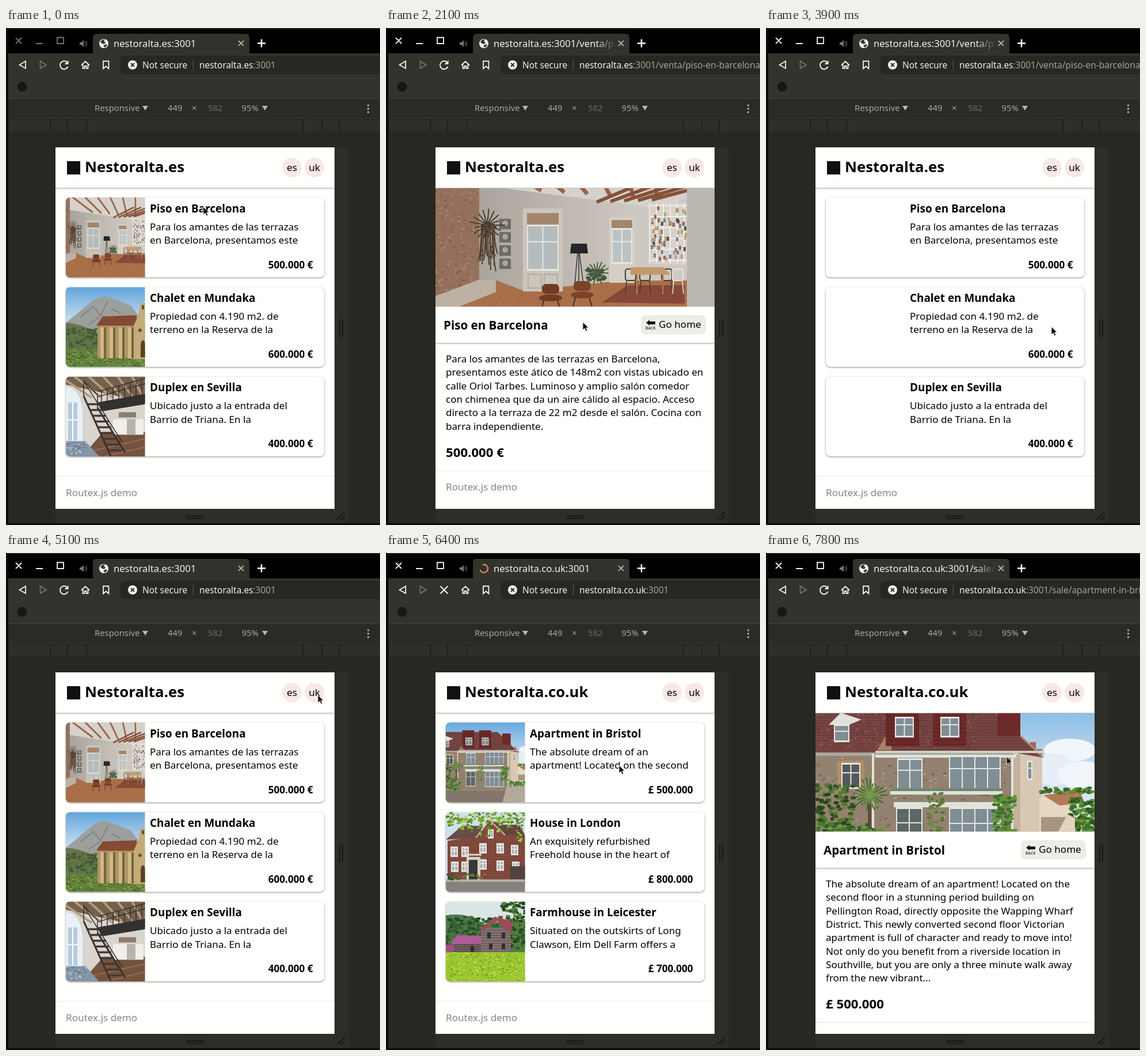
These frames come from a looping animation (650x862 px, 8000 ms). An HTML page:

```html
<!DOCTYPE html>
<html lang="en">
<head>
<meta charset="utf-8">
<title>Property listing demo</title>
<style>
html, body { margin: 0; width: 100%; height: 100%; overflow: hidden; background: #272822; }
svg { display: block; font-family: "Noto Sans", sans-serif; }
text { white-space: pre; }
.page { font-size: 17.1px; }
.serif { font-family: "Liberation Serif", serif; }
.bold { font-weight: 700; }
.card { fill: #fffffd; filter: drop-shadow(0 1px 1.5px rgba(0,0,0,.45)); }
.bar { fill: #fffffd; filter: drop-shadow(0 1px 1.5px rgba(0,0,0,.4)); }
.bare .photo { display: none; }
</style>
</head>
<body>
<svg id="stage" width="650" height="862" viewBox="0 0 650 862"></svg>
<script>
const BRAND = 'Nestoralta', HOST = 'nestoralta';
const $ = id => document.getElementById(id);

let seed = 7;
const rnd = () => (seed = (Math.imul(seed, 1664525) + 1013904223) >>> 0) / 2 ** 32;
const times = (n, f) => Array.from({ length: n }, (_, i) => f(i)).join('');
const rect = (x, y, w, h, fill, more = '') => `<rect x="${x}" y="${y}" width="${w}" height="${h}" fill="${fill}" ${more}/>`;
const path = (d, fill, more = '') => `<path d="${d}" fill="${fill}" ${more}/>`;
const line = (d, color, w = 1, more = '') => path(d, 'none', `stroke="${color}" stroke-width="${w}" ${more}`);
const disc = (x, y, r, fill, ry = r) => `<ellipse cx="${x}" cy="${y}" rx="${r}" ry="${ry}" fill="${fill}"/>`;
const text = (x, y, s, more = '') => `<text x="${x}" y="${y}" ${more}>${s}</text>`;

// Scattered leaves, stones or flowers inside a box
const scatter = (n, x, y, w, h, r, ...colors) => times(n, () =>
  disc((x + rnd() * w).toFixed(1), (y + rnd() * h).toFixed(1), r * (.6 + rnd() * .6), colors[rnd() * colors.length | 0], r * .6));
const spikes = (x, y, r, n, color) => line(times(n, i => {
  const a = i / n * 6.28, k = r * (.7 + rnd() * .4);
  return `M${x} ${y}l${(k * Math.cos(a)).toFixed(1)} ${(k * Math.sin(a)).toFixed(1)}`;
}), color, 2);
const panes = (x, y, w, h, n, glass = '#808d94') => rect(x, y, w, h, '#e6e7e2') +
  times(n, i => rect(x + 2 + i * (w - 2) / n, y + 3, (w - 2) / n - 2, h - 6, glass)) +
  rect(x, y + h * .36, w, 2, '#e6e7e2');

const chair = (x, y, c) => rect(x - 15, y - 14, 30, 17, c, 'rx="7"') + disc(x, y + 10, 20, c, 6) +
  line(`M${x - 12} ${y + 14}l-4 17M${x + 12} ${y + 14}l5 17`, '#4a2a1a', 2);

const photos = {
  piso: rect(80, 205, 500, 340, 'url(#wall)') +
    path('M160 205H580V278L470 312 330 294 160 272z', '#d6d2cb') +
    line(times(6, i => `M${270 + 40 * i} ${282 + 3 * i}L${160 + 62 * i} 214`), '#9b6347', 7) +
    line(times(5, i => `M${366 + 24 * i} ${302 - i}L${462 + 34 * i} 262`), '#87503a', 6) +
    path('M80 450L190 437 240 456 410 438H530V545H80z', '#a96f48') +
    line(times(7, i => `M${150 + 45 * i} 545L${205 + 34 * i} 455`), '#94603c') +
    path('M80 205H162V442L86 484H80z', '#94705c') +
    scatter(260, 84, 210, 76, 245, 2.6, '#a88470', '#80604f', '#9c7865') +
    path('M86 465L160 437H191V458L125 484H86z', '#bdb1a3') +
    times(4, i => rect(197, 331 + 23 * i, 20, 18, '#6d6b68') + disc(207, 339 + 23 * i, 5, '#a9a6a1')) +
    path('M375 476L420 446H519V478z', '#85493a') +
    rect(238, 313, 69, 144, '#cbc5bb') + rect(245, 321, 55, 20, '#a3876c') +
    panes(245, 341, 55, 80, 2, '#b4bcbd') + line('M247 427h23v24h-23zM275 427h23v24h-23z', '#aca59b', 1.5) +
    rect(388, 328, 44, 114, '#d5cfc6') + rect(392, 333, 36, 14, '#a3876c') + panes(392, 347, 36, 62, 2, '#bcc3c4') +
    rect(458, 302, 66, 108, '#d6d1ca') +
    line(times(6, i => `M${458 + 12 * i} 304v104`) + times(6, i => `M458 ${308 + 19 * i}h66`), '#f1eeea', 2) +
    times(60, () => rect(460 + rnd() * 60 | 0, 308 + rnd() * 92 | 0, 4, 7, ['#9c6259', '#77838a', '#b7a27c', '#55504a'][rnd() * 4 | 0])) +
    rect(523, 205, 57, 340, '#bab7b1') +
    spikes(176, 342, 30, 17, '#493b2e') +
    line(times(12, i => `M${166 + 2 * i} 340q${rnd() * 12 - 6 | 0} 35 ${i - 5} ${50 + rnd() * 35 | 0}`), '#4d3e30', 2) +
    scatter(30, 166, 335, 24, 65, 3, '#493b2e', '#685340') +
    line('M333 390L328 445M336 390L343 445M335 390V445', '#393734', 1.5) +
    path('M322 374H349L351 391H320z', '#242526') +
    spikes(366, 425, 22, 17, '#4f6141') + scatter(20, 350, 415, 32, 25, 4, '#42583a') +
    [425, 450, 488, 507].map((x, i) => rect(x - 9, 418, 18, 20, 'none', `rx="4" stroke="${i > 2 ? '#ece7dd' : '#4a382b'}" stroke-width="2"`) +
      line(`M${x - 7} 438l-2 23M${x + 8} 438l2 23`, i > 2 ? '#ece7dd' : '#4a382b', 1.6)).join('') +
    path('M425 415H482L495 428H425z', '#c29a69') + line('M436 428v34M481 428v34', '#a77a50', 3) +
    chair(286, 458, '#6f3b25') + chair(341, 453, '#7b432a'),

  bristol: rect(80, 205, 500, 390, 'url(#sky)') +
    disc(528, 342, 45, '#f1f6fa', 20) + disc(500, 375, 35, '#e6eff7', 28) + disc(550, 385, 42, '#f1f6fa', 24) +
    rect(80, 340, 400, 250, '#93826f') + scatter(420, 84, 346, 350, 185, 3, '#aa9985', '#79695a', '#9a7f66', '#8a7c6d') +
    path('M430 345L480 352V500H430z', '#d8c8b3') + panes(454, 360, 9, 34, 1) + rect(430, 350, 12, 150, '#c3b29c') +
    rect(459, 328, 10, 22, '#ae6051') +
    path('M80 258H380L482 355 430 346H80z', '#774643') +
    line(times(17, i => `M80 ${261 + 5 * i}H${381 + 5.2 * i}`), '#5f3534') +
    scatter(240, 84, 260, 285, 78, 2.5, '#8a5752', '#66393a') +
    line('M380 258L482 355', '#ad8d7b', 3) + path('M193 342L218 302V342z', '#aa8064') +
    [[208, 224], [290, 303]].map(([x, w]) => rect(x, 250, 58, 85, '#6c2a28') +
      line(times(12, i => `M${x} ${255 + 7 * i}h58`), '#531e1e') + panes(w, 284, 33, 36, 2)).join('') +
    rect(402, 265, 40, 53, '#6c2a28') + path('M109 298L130 277 166 289 144 298z', '#e0e1de') + panes(118, 297, 27, 31, 1) +
    rect(80, 346, 350, 6, '#a9a89c') + rect(190, 343, 292, 4, '#cdd2c8') + rect(190, 350, 245, 5, '#dfe4db') +
    rect(124, 360, 46, 50, '#b18e68') + panes(131, 364, 33, 45, 2, '#535a5b') +
    panes(228, 356, 44, 55, 2) + panes(318, 351, 90, 61, 4) +
    rect(216, 408, 195, 5, '#71866f') + rect(216, 413, 195, 6, '#dce4d8') + rect(222, 432, 190, 9, '#dce4d8') +
    panes(226, 441, 46, 72, 2, '#5c6766') + panes(318, 441, 90, 75, 4) +
    line('M186 348V485M428 355V515', '#e5e3d9', 4) +
    path('M475 425L500 417 533 423V486H475z', '#e5d7c2') + path('M482 420L545 412 554 433 510 438z', '#b67956') +
    scatter(60, 478, 407, 92, 10, 4, '#3d672d', '#648c36') + scatter(130, 528, 425, 50, 60, 5, '#41712a', '#609637', '#315622') +
    scatter(110, 86, 402, 66, 85, 5, '#365926', '#4f7b2f', '#29451f') + spikes(180, 420, 30, 25, '#3f652f') + spikes(180, 420, 25, 19, '#78974b') +
    line('M180 435V485', '#5d4d3d', 6) + scatter(50, 282, 410, 26, 75, 3.5, '#50702f', '#6a843f') +
    scatter(85, 395, 420, 38, 65, 4.5, '#3e702b', '#609537') + scatter(150, 86, 468, 116, 82, 6, '#355c27', '#6b963c', '#497a2e') +
    rect(80, 535, 350, 60, '#83756b') + path('M430 490H580V595H400z', '#b2a99a') + rect(478, 458, 50, 28, '#a9957e') +
    path('M508 483L524 453 537 460V490z', '#e2d3bd') + scatter(65, 440, 488, 140, 25, 6, '#416f2d', '#5a8a35'),

  mundaka: rect(0, 0, 139, 139, 'url(#sky)') +
    path('M0 62L22 44 48 22 66 15 88 22 113 32 139 66V95H0z', '#9c9f9c') +
    line('M25 52L48 34 60 50 73 25M40 65L58 52M80 38L95 46', '#7d8384', 2) +
    path('M0 62Q30 64 60 82V115H0z', '#64754d') + scatter(90, 0, 72, 58, 34, 3.5, '#425a35', '#59713e') +
    rect(0, 108, 139, 31, '#62813c') + scatter(140, 0, 110, 138, 28, 2.5, '#486b2c', '#82994b') +
    rect(55, 65, 65, 58, '#ad9564') + path('M64 51L122 49 128 67H53z', '#854a34') +
    path('M117 70L126 48 130 27 138 28V125H113z', '#c4ac79') +
    times(4, i => rect(60 + 16 * i, 70, 6, 54, '#d0b882') + rect(66 + 16 * i, 70, 4, 54, '#75653f')) +
    path('M130 122V98Q134 86 138 98V122z', '#5b4028') + disc(134, 35, 2, '#584b39', 4) + disc(129, 75, 3, '#655336'),

  sevilla: rect(0, 0, 139, 139, '#d8d4ce') + path('M0 0H139V45L50 25 0 14z', '#75604b') +
    line(times(7, i => `M${-10 + 25 * i} 0L${45 + 18 * i} 37`), '#b19b80', 4) +
    path('M0 18Q27 20 29 65V118H0z', '#e9f1f7') + rect(4, 45, 16, 66, '#b7cbd9') + line('M12 45v66M4 75h16', '#fff', 2) +
    path('M28 139L65 96H139V139z', '#74533f') + line('M40 130L139 108M65 139L139 122', '#936b50', 2) +
    path('M0 112H34L58 139H0z', '#8496a7') + scatter(30, 1, 114, 34, 22, 2, '#b7c2cc', '#65798e') +
    rect(82, 74, 53, 27, '#f1efe9') + rect(106, 74, 15, 27, '#b8b3ad') + rect(92, 62, 30, 9, '#8c7c6a') +
    path('M54 45L139 30V48L65 60z', '#343030') + line('M56 35L139 12M56 26L139 3' + times(8, i => `M${62 + 10 * i} ${25 - 2.7 * i}v26`), '#302d2b', 1.4) +
    line('M31 34L78 138M55 54L103 132', '#39302c', 3) + line(times(9, i => `M${36 + 5 * i} ${48 + 10 * i}h${25 - i * .5}`), '#443831', 3.5) +
    line('M31 34V8L55 32V55M31 8L98 114', '#312d2b', 1.5),

  london: rect(0, 0, 139, 139, '#cee0ed') + path('M3 50L52 42 76 14 103 38 139 43V123H3z', '#814a3d') +
    path('M0 48L28 24H65L52 45z', '#684c45') + path('M76 14L100 22H128L139 43 103 40z', '#65463e') + line('M52 45L76 14 103 40', '#d0b9aa', 2) +
    line(times(14, i => `M3 ${52 + 5 * i}H139`), '#733e33', .7) +
    [[8, 60], [27, 60], [58, 54], [88, 54], [113, 57], [9, 86], [27, 86], [58, 82], [88, 84], [115, 86]].map(([x, y]) => panes(x, y, 13, 18, 2, '#a6adad')).join('') +
    panes(73, 30, 10, 16, 2) + rect(36, 78, 24, 39, '#d7d0c5') + rect(40, 83, 15, 34, '#343936') + line('M33 74H62', '#e2d7c6', 3) +
    rect(112, 94, 26, 24, '#51433e') + rect(0, 117, 139, 22, '#85817d') + rect(0, 117, 139, 4, '#b8b0a7') +
    scatter(20, 2, 108, 22, 9, 3, '#526e35', '#385028') + scatter(14, 30, 107, 38, 9, 3, '#597a38', '#a2624a') +
    scatter(90, 0, 0, 138, 18, 3, '#75a332', '#a8c84c', '#4e7c2a') + times(8, i => scatter(16, 4 + 17 * i, 9, 10, 18 + 26 * rnd(), 2.6, '#78a82f', '#a8ce4d', '#55832b')),

  farm: rect(0, 0, 139, 139, '#dae5e6') + path('M0 24Q40 18 67 40L139 30V92H0z', '#53784a') +
    scatter(200, 0, 27, 90, 52, 4, '#315c32', '#477541', '#244924') + scatter(160, 98, 0, 42, 81, 4, '#315f29', '#1f4722', '#56803b') +
    rect(61, 46, 52, 42, '#847270') + line(times(9, i => `M61 ${50 + 4.5 * i}h52`), '#574d4c') +
    path('M58 48L84 28 112 32 117 51 101 48 89 33 66 49z', '#a1495b') + rect(91, 25, 8, 13, '#944a49') +
    rect(10, 71, 51, 19, '#706060') + line(times(4, i => `M10 ${75 + 4 * i}h51`), '#493f41') + path('M8 74L18 59H61V73z', '#af5c96') + rect(0, 75, 14, 12, '#a35183') +
    [[72, 54], [97, 54], [75, 73], [97, 73], [43, 77]].map(([x, y]) => rect(x, y, 6, 10, '#302b2d')).join('') +
    rect(0, 88, 139, 51, '#9cc730') + scatter(240, 0, 88, 138, 50, 1.8, '#bfdc3c', '#7db02c', '#e0da52', '#699a28')
};

const fit = { piso: 'matrix(.37 0 0 .45 -53 -101)', bristol: 'matrix(.36 0 0 .37 -46.5 -79)' };

const header = (tld, s) => `<rect class="bar" x="86" y="200" width="485" height="${77 - s}"/>` +
  rect(106, 231 - s, 23, 23, '#111') + text(137, 250 - s, BRAND + tld, 'class="bold" font-size="25.8"') +
  ['es', 'uk'].map((l, i) => disc(497 + 39 * i, 242 - s, 17, '#f9e8e7') + text(497 + 39 * i, 248 - 2.2 * s, l, 'text-anchor="middle"')).join('');
const footer = (y, base) => rect(86, y, 485, 1, '#e4e4e2') + text(104, base, 'Routex.js demo', 'fill="#858583"');

// s is 1 while the fallback serif face is in use
const home = (id, tld, s, cards) => `<g id="${id}" class="page ${s ? 'serif' : ''}">` + header(tld, s) +
  cards.map(([photo, title, price, ...body], i) => `<g transform="translate(104 ${294 - s + 155.2 * i})">
    <rect class="card" width="449.5" height="138.5" rx="8"/>
    <g class="photo" clip-path="url(#thumb)"><use href="#${photo}" transform="${fit[photo] || ''}"/></g>` +
    text(146, s ? 22 : 25.5, title, 'class="bold" font-size="18.9"') +
    `<g clip-path="url(#excerpt${s})">` + body.map((l, k) => text(146, s ? 51 + 20 * k : 57 + 23.3 * k, l)).join('') + '</g>' +
    text(429.5, s ? 124 : 123, price, 'class="bold" text-anchor="end"') + '</g>').join('') +
  footer(777 - 1.5 * s, 812 - 3 * s) + '</g>';

const detail = (id, tld, photo, title, price, ...body) => {
  const end = 580 + 23.3 * body.length;
  return `<g id="${id}" class="page">` + header(tld, 0) +
    `<g class="photo" clip-path="url(#hero)"><use href="#${photo}"/></g>` +
    `<rect class="bar" x="86" y="484" width="485" height="62"/>` + rect(86, 483, 485, 1, '#e2e2e0') +
    text(100, 522.5, title, 'class="bold" font-size="20.6"') + rect(443, 498, 113, 33.5, '#ecece9', 'rx="8"') +
    path('M452 511L458 506.5V509H468V514H458V516z', '#111') +
    text(451, 523, 'BACK', 'font-size="7"') + text(474, 520, 'Go home') +
    body.map((l, i) => text(104, 580 + 23.3 * i, l)).join('') +
    text(104, end + 24, price, 'class="bold" font-size="22.2"') + footer(end + 47.5, end + 82.5) + '</g>';
};

const icon = '#f2f2ee', dim = '#777870', dark = '#171814';
const chrome = rect(0, 0, 650, 862, '#272822') + rect(0, 0, 650, 45, '#000') + rect(4, 0, 646, 1, '#474843') +
  path('M151 44V17Q151 10 158 10H416Q423 10 423 17V44z', '#32332d') + rect(4, 44, 646, 78, '#32332d') +
  rect(0, 122, 650, 1, '#41423c') + rect(4, 123, 646, 33, '#2a2b26') + rect(4, 156, 646, 1, '#393a34') +
  rect(6, 159, 644, 20, '#2e2f29') + [77, 107, 140, 516, 549, 579].map(x => rect(x - 1, 158, 2, 21, '#20211c')).join('') +
  rect(571, 207, 24, 651, '#2d2e28') + rect(86, 834, 509, 24, '#2d2e28') + rect(0, 0, 4, 862, '#080908') + rect(0, 859, 650, 3, '#0c0d0a') +
  `<g id="buttons">` + line('M17 17L27 27M27 17L17 27M52 27H64M89 16.5H100V27H89z', 'currentColor', 1.8) + '</g>' +
  path('M128 25h3l4-4v12l-4-4h-3z', dim) + line('M137 24q2 3 0 6M139 22q3 5 0 10', dim) +
  line('M404 22L413 31M413 22L404 31', '#c8c8c3', 1.6) + line('M437 26.5H451M444 19.5V33.5', '#fff', 2.6) +
  line('M34 57.5V70L23.5 64z', icon, 1.8) + line('M59.5 57.5V70L70 64z', dim, 1.6) +
  line('M131 64.5L138 58 145 64.5M133.5 63V70H136.5V66H139.5V70H142.5V63', icon, 1.8) +
  line('M169 57.5H178.5V70.5L173.8 66.5 169 70.5z', icon, 1.8) +
  `<g id="reload">` + line('M106.5 60A7 7 0 1 0 107.5 67', icon, 2) + path('M108.5 56V63H101.5z', icon) + '</g>' +
  `<g id="stop">` + line('M94.5 57.5L107.5 70.5M107.5 57.5L94.5 70.5', icon, 2) + '</g>' +
  path('M650 48H207Q199 48 199 56V72Q199 80 207 80H650z', '#272823') +
  disc(220, 64, 8, '#eeeeea') + line('M217 61L223 67M223 61L217 67', '#272823', 1.8) +
  text(237, 70, 'Not secure', 'fill="#eeeeea" font-size="15.4"') + rect(325, 55, 1, 18, '#5d5e57') +
  text(336, 70, '<tspan id="host" fill="#f2f2ee"></tspan><tspan id="route" fill="#a1a29b"></tspan>', 'font-size="15.4"') +
  `<g id="globe">` + disc(170, 27, 8, '#f4f4f1') + path('M164 24q4-5 8-4l-2 3 3 2-2 3-4-1zM169 31l5-3 2 2-4 4z', '#32332d') + '</g>' +
  line('M170 20A7 7 0 1 0 177 27', 'currentColor', 2.4, 'id="spinner"') +
  text(187, 33, '', 'id="tab" font-size="16.6" fill="url(#fade)" clip-path="url(#tabclip)"') +
  disc(28, 102, 8.5, dark) +
  `<g font-size="14.8" fill="#a6a79f">` + text(154, 144, 'Responsive') + text(281, 144, '449') + text(323, 144, '×') +
  text(351, 144, '582', 'fill="#696a63"') + text(409.5, 144, '95%') + '</g>' +
  path('M237 135h10l-5 8zM445 135h10l-5 8z', '#b8b9b1') + [134, 140, 146].map(y => disc(629.5, y, 1.8, '#a6a79f')).join('') +
  line('M580 505V536M585 505V536M313 846.5H344M313 850.5H344M575 853L589 839M582 853L589 846', dark, 2);

const farm = ['farm', 'Farmhouse in Leicester', '£ 700.000', 'Situated on the outskirts of Long', 'Clawson, Elm Dell Farm offers a', 'beautiful setting for a country lifestyle'];
const defs = `<defs>
  <linearGradient id="sky" x2="0" y2="1"><stop stop-color="#63a5dc"/><stop offset=".5" stop-color="#d6e7f3"/></linearGradient>
  <linearGradient id="wall"><stop offset=".15" stop-color="#aaa39b"/><stop offset=".7" stop-color="#cdc8c1"/></linearGradient>
  <linearGradient id="fade" gradientUnits="userSpaceOnUse" x1="365" x2="396"><stop stop-color="#f0f0ec"/><stop offset="1" stop-color="#f0f0ec" stop-opacity=".1"/></linearGradient>
  <clipPath id="tabclip"><path d="M180 12H396V42H180z"/></clipPath>
  <clipPath id="view"><path d="M86 207H571V834H86z"/></clipPath>
  <clipPath id="hero"><path d="M86 278H571V483H86z"/></clipPath>
  <clipPath id="thumb"><path d="M8 0H137.5V138.5H8Q0 138.5 0 130.5V8Q0 0 8 0"/></clipPath>
  <clipPath id="excerpt0"><path d="M140 30H449V83H140z"/></clipPath>
  <clipPath id="excerpt1"><path d="M140 30H449V79H140z"/></clipPath>` +
  Object.entries(photos).map(([id, art]) => `<g id="${id}">${art}</g>`).join('') + '</defs>';

$('stage').innerHTML = defs + chrome + '<g id="pages" clip-path="url(#view)">' + rect(86, 207, 485, 627, '#fffffd') +
  home('homeEs', '.es', 0, [
    ['piso', 'Piso en Barcelona', '500.000 €', 'Para los amantes de las terrazas', 'en Barcelona, presentamos este'],
    ['mundaka', 'Chalet en Mundaka', '600.000 €', 'Propiedad con 4.190 m2. de', 'terreno en la Reserva de la'],
    ['sevilla', 'Duplex en Sevilla', '400.000 €', 'Ubicado justo a la entrada del', 'Barrio de Triana. En la']]) +
  home('homeSerif', '.co.uk', 1, [
    ['bristol', 'Apartment in Bristol', '£ 500.000', 'The absolute dream of an apartment!', 'Located on the second floor in a', 'stunning period building on'],
    ['london', 'House in London', '£ 800.000', 'An exquisitely refurbished Freehold', 'house in the heart of London. The house', 'benefits from a modern kitchen and'],
    farm]) +
  home('homeUk', '.co.uk', 0, [
    ['bristol', 'Apartment in Bristol', '£ 500.000', 'The absolute dream of an', 'apartment! Located on the second'],
    ['london', 'House in London', '£ 800.000', 'An exquisitely refurbished', 'Freehold house in the heart of'],
    farm]) +
  detail('saleEs', '.es', 'piso', 'Piso en Barcelona', '500.000 €',
    'Para los amantes de las terrazas en Barcelona,', 'presentamos este ático de 148m2 con vistas ubicado en',
    'calle Oriol Tarbes. Luminoso y amplio salón comedor', 'con chimenea que da un aire cálido al espacio. Acceso',
    'directo a la terraza de 22 m2 desde el salón. Cocina con', 'barra independiente.') +
  detail('saleUk', '.co.uk', 'bristol', 'Apartment in Bristol', '£ 500.000',
    'The absolute dream of an apartment! Located on the', 'second floor in a stunning period building on',
    'Pellington Road, directly opposite the Wapping Wharf', 'District. This newly converted second floor Victorian',
    'apartment is full of character and ready to move into!', 'Not only do you benefit from a riverside location in',
    'Southville, but you are only a three minute walk away', 'from the new vibrant...') +
  rect(104, 294, 449.5, 138.5, 'rgba(51,181,229,.39)', 'id="tap" rx="3"') + '</g>' +
  path('M0 0V14L3.3 11 5.5 16 8 15 5.8 10H10z', '#111', 'id="cursor" stroke="#fff" stroke-width=".9"');

// Pointer stops: time, x, y
const stops = [
  [0, 343, 310], [500, 342, 318], [600, 340, 328], [700, 339, 338], [800, 338, 345], [900, 338, 349],
  [1700, 332, 365], [1800, 322, 410], [1900, 328, 460], [2000, 338, 495], [2100, 342, 510],
  [2300, 365, 530], [2400, 420, 555], [2500, 465, 548], [2600, 488, 534], [2700, 494, 526], [3000, 496, 518],
  [4400, 508, 412], [4600, 516, 370], [4700, 528, 310], [4800, 538, 272], [4900, 541, 260], [5100, 542, 246],
  [6000, 530, 262], [6100, 500, 290], [6200, 460, 325], [6300, 425, 352], [6400, 405, 368], [6500, 396, 376], [7800, 418, 353]];
const views = [[0, 'homeEs'], [1200, 'saleEs'], [3900, 'homeEs'], [5700, 'homeSerif'], [6400, 'homeUk'], [7200, 'saleUk']];
const routes = [[0, '.es', ''], [1200, '.es', '/venta/piso-en-barcelona'], [4000, '.es', ''], [5600, '.co.uk', ''], [7200, '.co.uk', '/sale/apartment-in-bristol']];
const at = (list, t) => list.findLast(e => e[0] <= t);
const show = (id, on) => $(id).style.display = on ? '' : 'none';

let last = -1;
function frame(now) {
  const t = Math.floor(now % 8000 / 100) * 100;
  if (t !== last) {
    last = t;
    const view = at(views, t), [, tld, route] = at(routes, t), [, x, y] = at(stops, t);
    for (const [, id] of views) show(id, id === view[1]);
    $('pages').classList.toggle('bare', view[0] > 0 && view[0] !== 6400 && t < view[0] + 100);
    show('tap', t === 1100 || t === 7100);
    const busy = t >= 5500 && t < 6500;
    for (const id of ['spinner', 'stop']) show(id, busy);
    for (const id of ['globe', 'reload']) show(id, !busy);
    $('spinner').setAttribute('color', t < 5600 ? '#8d8e87' : '#d98462');
    $('spinner').setAttribute('transform', `rotate(${(t - 5800) * .42} 170 27)`);
    $('buttons').setAttribute('color', t < 500 ? '#777870' : '#f2f2ee');
    $('host').textContent = HOST + tld;
    $('route').textContent = ':3001' + route;
    $('tab').textContent = HOST + tld + ':3001' + route;
    $('cursor').setAttribute('transform', `translate(${x} ${y})`);
  }
  requestAnimationFrame(frame);
}
frame(0);
</script>
</body>
</html>
```
